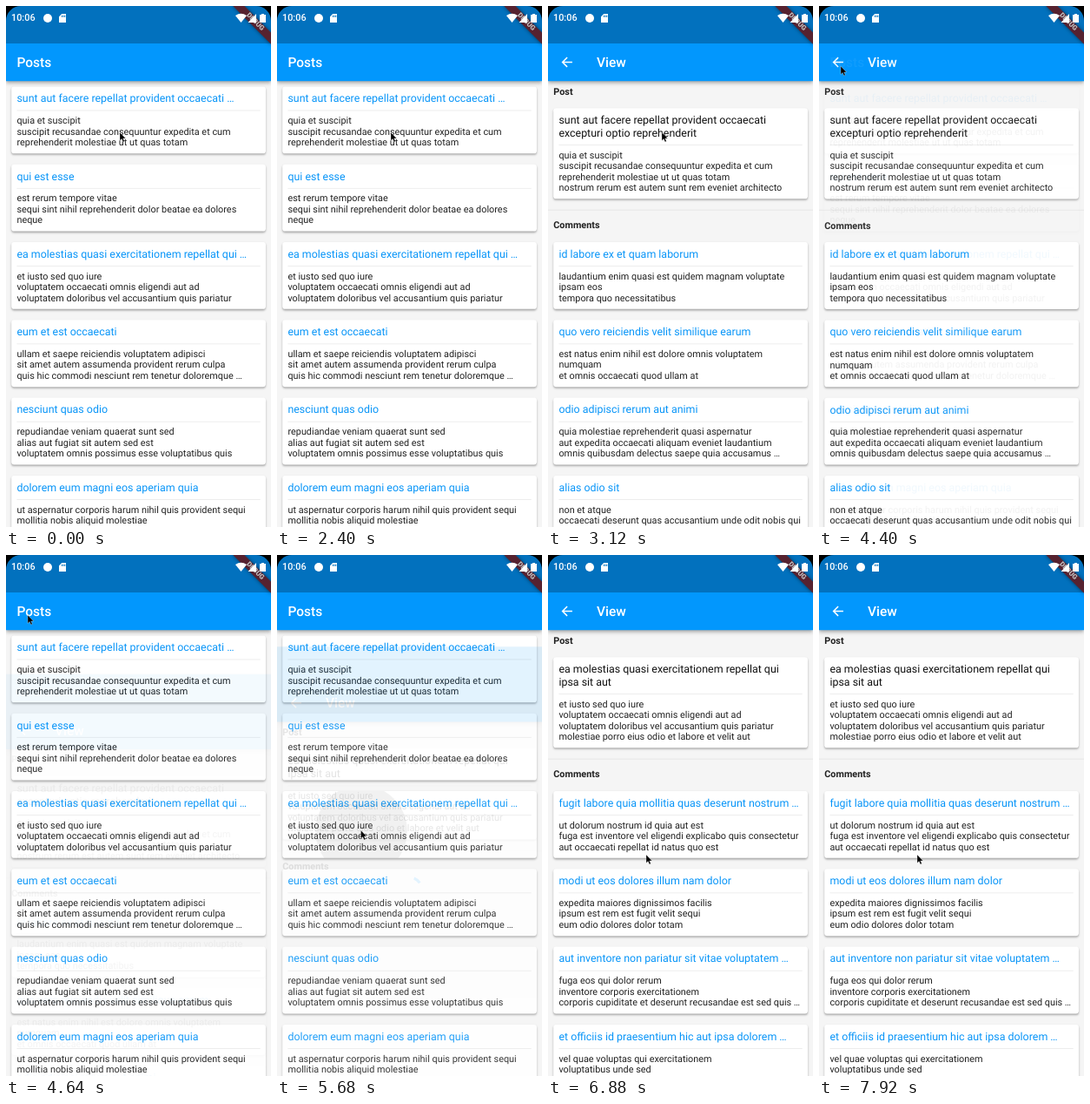
An HTML page for the animation above (8000 ms loop, 305x598 px).

```html
<!DOCTYPE html>
<html lang="en">
<head>
<meta charset="utf-8">
<title>Posts</title>
<style>
html, body { margin: 0; width: 100%; height: 100%; overflow: hidden; background: #000; }
#stage { position: absolute; left: 0; top: 0; width: 305px; height: 598px; overflow: hidden; }
.overlay { position: absolute; left: 0; top: 0; width: 305px; height: 598px; }
/* The app is laid out in its own units and scaled down as a whole. */
#app { position: absolute; left: 0; top: 0; width: 393px; height: 771px; transform: scale(.7765); transform-origin: 0 0;
  font: 14px/16px Roboto, sans-serif; color: #212121; white-space: nowrap; text-rendering: geometricPrecision; }
.page, .fill { position: absolute; left: 0; top: 0; width: 393px; height: 771px; }
.page { background: #f5f5f5; }
.bar { position: absolute; left: 0; top: 0; width: 393px; height: 111px; background: #0297fd;
  box-shadow: 0 2px 4px -1px rgba(0,0,0,.2), 0 4px 5px rgba(0,0,0,.14), 0 1px 10px rgba(0,0,0,.12); }
.bar b { position: absolute; top: 71px; font-size: 20px; line-height: 24px; font-weight: 500; color: #fff; }
.card { position: absolute; left: 8px; width: 361px; padding: 8px; background: #fff;
  border-radius: 4px; overflow: hidden; box-shadow: 0 2px 3px rgba(0,0,0,.32); }
.card h2 { margin: 0; font-size: 16px; line-height: 19px; font-weight: 400; color: #0895f8; }
.card.full h2 { color: #111; }
.card hr { border: 0; height: 1px; margin: 7.5px 0; background: #e8e8e8; }
.label { position: absolute; left: 8px; font-weight: 700; }
.rule { position: absolute; left: 0; top: 300.5px; width: 393px; height: 1px; background: #e2e2e2; }
.ripple { position: absolute; border-radius: 50%; background: #000; }
.debug { position: absolute; left: 329px; top: 18px; width: 80px; height: 12px; text-align: center;
  font-size: 10.2px; line-height: 12px; font-weight: 900; color: #fff; background: rgba(141,22,22,.81);
  box-shadow: 0 0 6px rgba(0,0,0,.5); transform: rotate(45deg); }
.scrim { position: absolute; left: 0; top: 0; width: 305px; height: 43px; background: rgba(0,0,0,.25); }
.corners { position: absolute; left: 0; top: 0; width: 305px; height: 640px;
  border-radius: 17px; box-shadow: 0 0 0 30px #000; }
.clock { position: absolute; left: 6px; top: 8px; font: 500 10.88px/12.5px Roboto, sans-serif; color: #fff; }
</style>
</head>
<body>
<div id="stage">
  <div id="app">
    <div class="page" id="posts"><div class="bar"><b style="left:16px">Posts</b></div></div>
    <div class="page" id="view"></div>
    <div class="debug">DEBUG</div>
  </div>
  <div class="scrim"></div>
  <div class="clock">10:06</div>
  <svg class="overlay" viewBox="0 0 305 598" fill="#fff">
    <circle cx="48" cy="14" r="5"/>
    <path d="M64.2 9H69V19H61V12.2ZM64 10.7v2h1v-2ZM65.7 10.7v2h1v-2ZM67.3 10.7v2h1v-2Z" fill-rule="evenodd"/>
    <path d="M264 11Q270.5 6.5 277 11L270.5 19ZM278.5 19L288 9V19Z"/>
    <path d="M292 10H294V9H297V10H299V19H292Z"/>
  </svg>
  <div class="corners"></div>
  <svg class="overlay" viewBox="0 0 305 598">
    <path id="cursor" d="M0 0V9.5L2.2 7.5L3.7 11L5.3 10.3L3.8 7H6.7Z" stroke="#fff" stroke-opacity=".6" stroke-width=".5"/>
  </svg>
</div>
<script>
const $ = id => document.getElementById(id);
const LOOP = 8000, STEP = 80, FIRST = 119, PITCH = 115, RISE = 192.5;

// Each card is its title lines and its body lines.
const feed = [
  ['sunt aut facere repellat provident occaecati …',
   'quia et suscipit|suscipit recusandae consequuntur expedita et cum|reprehenderit molestiae ut ut quas totam'],
  ['qui est esse',
   'est rerum tempore vitae|sequi sint nihil reprehenderit dolor beatae ea dolores|neque'],
  ['ea molestias quasi exercitationem repellat qui …',
   'et iusto sed quo iure|voluptatem occaecati omnis eligendi aut ad|voluptatem doloribus vel accusantium quis pariatur'],
  ['eum et est occaecati',
   'ullam et saepe reiciendis voluptatem adipisci|sit amet autem assumenda provident rerum culpa|quis hic commodi nesciunt rem tenetur doloremque …'],
  ['nesciunt quas odio',
   'repudiandae veniam quaerat sunt sed|alias aut fugiat sit autem sed est|voluptatem omnis possimus esse voluptatibus quis'],
  ['dolorem eum magni eos aperiam quia',
   'ut aspernatur corporis harum nihil quis provident sequi|mollitia nobis aliquid molestiae|']
];

const visits = [
  { open: 2480, loaded: 3040, close: 4390, card: 0, tap: [169, 188],
    post: ['sunt aut facere repellat provident occaecati|excepturi optio reprehenderit',
      'quia et suscipit|suscipit recusandae consequuntur expedita et cum|reprehenderit molestiae ut ut quas totam|nostrum rerum est autem sunt rem eveniet architecto'],
    comments: [
      ['id labore ex et quam laborum',
       'laudantium enim quasi est quidem magnam voluptate|ipsam eos|tempora quo necessitatibus'],
      ['quo vero reiciendis velit similique earum',
       'est natus enim nihil est dolore omnis voluptatem|numquam|et omnis occaecati quod ullam at'],
      ['odio adipisci rerum aut animi',
       'quia molestiae reprehenderit quasi aspernatur|aut expedita occaecati aliquam eveniet laudantium|omnis quibusdam delectus saepe quia accusamus …'],
      ['alias odio sit',
       'non et atque|occaecati deserunt quas accusantium unde odit nobis qui|']] },
  { open: 5598, loaded: 6240, close: 9000, card: 2, tap: [125, 408],
    post: ['ea molestias quasi exercitationem repellat qui|ipsa sit aut',
      'et iusto sed quo iure|voluptatem occaecati omnis eligendi aut ad|voluptatem doloribus vel accusantium quis pariatur|molestiae porro eius odio et labore et velit aut'],
    comments: [
      ['fugit labore quia mollitia quas deserunt nostrum …',
       'ut dolorum nostrum id quia aut est|fuga est inventore vel eligendi explicabo quis consectetur|aut occaecati repellat id natus quo est'],
      ['modi ut eos dolores illum nam dolor',
       'expedita maiores dignissimos facilis|ipsum est rem est fugit velit sequi|eum odio dolores dolor totam'],
      ['aut inventore non pariatur sit vitae voluptatem …',
       'fuga eos qui dolor rerum|inventore corporis exercitationem|corporis cupiditate et deserunt recusandae est sed quis …'],
      ['et officiis id praesentium hic aut ipsa dolorem …',
       'vel quae voluptas qui exercitationem|voluptatibus unde sed|']] }
];

// time, x, y
const moves = [[0, 131, 145], [3600, 131, 145], [4200, 25, 69], [4720, 25, 69],
  [5360, 96.5, 316], [6320, 96.5, 316], [6720, 113, 344], [8000, 113, 344]];

const clamp = v => Math.max(0, Math.min(1, v));
const lines = s => s.replaceAll('|', '<br>');
const card = ([title, body], top, type = '') =>
  `<div class="card ${type}" style="top:${top}px"><h2>${lines(title)}</h2><hr>${lines(body)}</div>`;
const list = (cards, top) => cards.map((c, i) => card(c, top + i * PITCH)).join('');

function bezier(x1, y1, x2, y2) {
  const at = (a, b, s) => 3 * (1 - s) ** 2 * s * a + 3 * (1 - s) * s * s * b + s ** 3;
  return x => {
    let lo = 0, hi = 1;
    for (let i = 0; i < 20; i++) {
      const mid = (lo + hi) / 2;
      if (at(x1, x2, mid) < x) lo = mid; else hi = mid;
    }
    return at(y1, y2, lo);
  };
}
const fastOutSlowIn = bezier(.4, 0, .2, 1);
const easeIn = bezier(.42, 0, 1, 1);

$('posts').insertAdjacentHTML('afterbegin', list(feed, FIRST));
const feedCards = $('posts').querySelectorAll('.card');

$('view').innerHTML = `<div class="bar"><b style="left:72px">View</b>
  <svg class="fill" viewBox="0 0 393 771"><path d="M28.500 76L21.500 83L28.500 90M21.500 83H36" fill="none" stroke="#fff" stroke-width="2"/></svg></div>
  <div class="label" style="top:119px">Post</div><div class="rule"></div>
  <div class="label" style="top:317px">Comments</div>
  <svg class="fill" id="spinner" viewBox="0 0 393 771"><path id="arc" fill="none" stroke="#0297fd" stroke-width="4"/></svg>`;

for (const v of visits) {
  const add = html => {
    const box = document.createElement('div');
    box.innerHTML = html;
    return $('view').appendChild(box);
  };
  v.postBox = add(card(v.post, 151, 'full'));
  v.commentBox = add(list(v.comments, FIRST + 2 * PITCH));
  v.ripple = document.createElement('div');
  v.ripple.className = 'ripple';
  feedCards[v.card].append(v.ripple);
}

function drawRipple(v, t) {
  const age = t - v.open + 80;
  const r = Math.max(0, age * .42);
  const alpha = age < 0 ? 0 : .06 * (1 - clamp((age - 160) / 200));
  v.ripple.style.cssText = `left:${v.tap[0] - 8 - r}px;top:${v.tap[1] - FIRST - v.card * PITCH - r}px;` +
    `width:${2 * r}px;height:${2 * r}px;opacity:${alpha}`;
}

function drawSpinner(age) {
  const start = -Math.PI / 2 + age / 2222 * 2 * Math.PI;
  const sweep = Math.max(.01, fastOutSlowIn(clamp(age / 666)) * 1.5 * Math.PI);
  const point = a => `${196.5 + 18 * Math.cos(a)} ${359 + 18 * Math.sin(a)}`;
  $('arc').setAttribute('d', `M${point(start)}A18 18 0 ${+(sweep > Math.PI)} 1 ${point(start + sweep)}`);
}

function drawCursor(t) {
  const i = moves.findIndex(m => m[0] > t);
  const [t0, x0, y0] = moves[i - 1], [t1, x1, y1] = moves[i];
  const p = (t - t0) / (t1 - t0), k = p * p * (3 - 2 * p);
  $('cursor').setAttribute('transform', `translate(${x0 + (x1 - x0) * k} ${y0 + (y1 - y0) * k})`);
}

function draw(t) {
  const now = t < 5000 ? visits[0] : visits[1];
  const shown = clamp((t - now.open) / 300) - clamp((t - now.close) / 300);
  $('view').style.visibility = shown > 0 ? 'visible' : 'hidden';
  $('view').style.opacity = easeIn(shown);
  $('view').style.transform = shown < 1 ? `translateY(${RISE * (1 - fastOutSlowIn(shown))}px)` : 'none';
  for (const v of visits) {
    v.postBox.hidden = v !== now;
    v.commentBox.hidden = v !== now || t < v.loaded;
    drawRipple(v, t);
  }
  $('spinner').style.display = t < now.loaded ? '' : 'none';
  drawSpinner(Math.max(0, t - now.open + 50));
  drawCursor(t);
}

function frame() {
  draw(Math.floor(performance.now() % LOOP / STEP) * STEP);
  requestAnimationFrame(frame);
}
frame();
</script>
</body>
</html>
```
